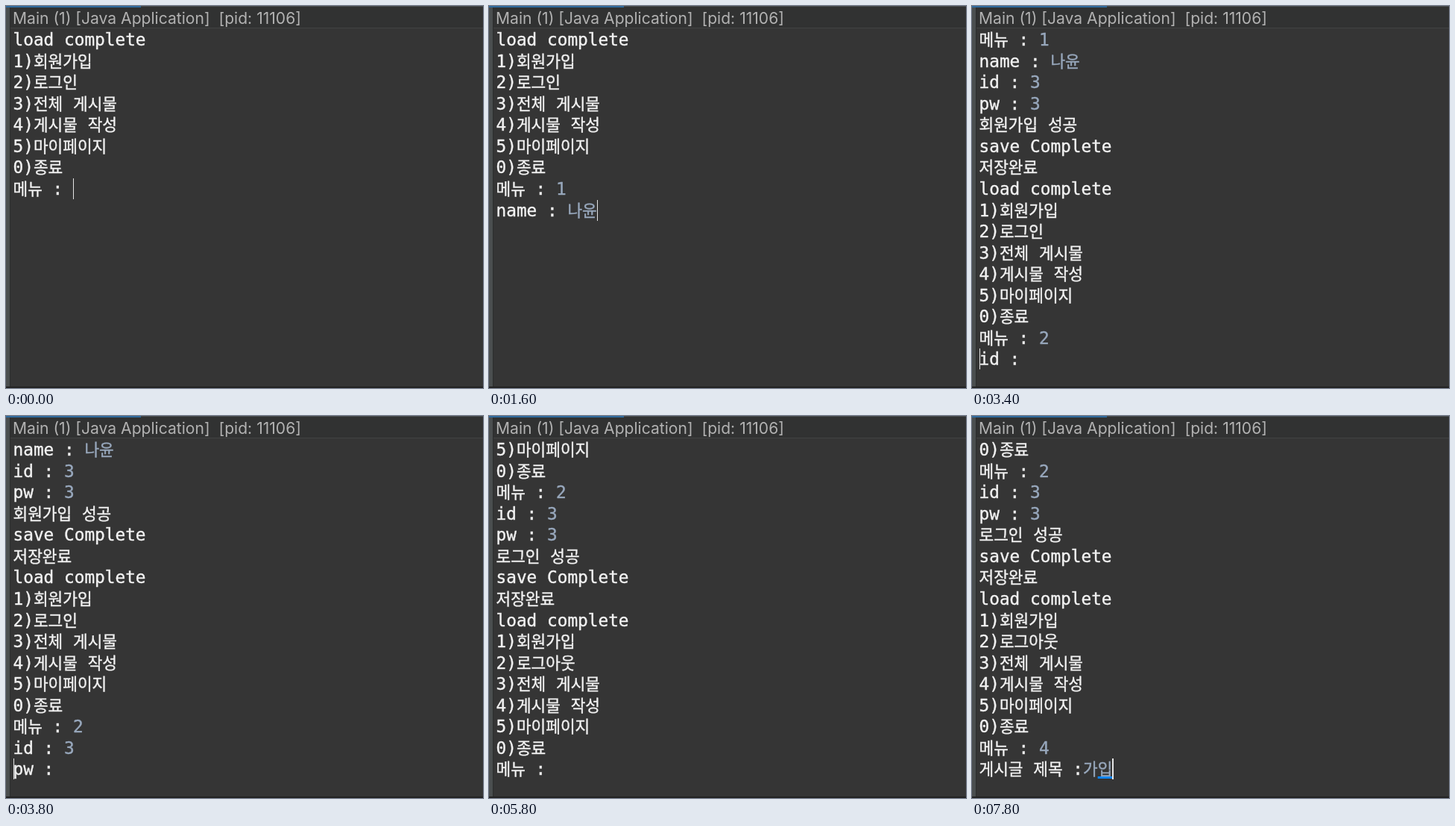
An HTML page that plays this animation: 640x512 px, repeating every 8000 ms.

```html
<!DOCTYPE html>
<html lang="ko">
<head>
<meta charset="utf-8">
<title>Console</title>
<style>
  html, body { margin: 0; width: 100%; height: 100%; overflow: hidden; background: #353535; }
  #stage { position: absolute; left: 0; top: 0; width: 640px; height: 512px; overflow: hidden; background: #353535; }
  #stage > div { position: absolute; }
  #header { left: 6px; top: 0; width: 634px; height: 29px; background: #313232; border-bottom: 1px solid #424343; }
  #gutter { left: 0; top: 0; width: 5px; height: 512px; background: #4a4e4f; border-right: 1px solid #2c2d2d; }
  #top { left: 0; top: 0; width: 640px; height: 1px; background: #4b4f51; }
  #tab { left: 0; top: 0; width: 181px; height: 2px; background: #2f6a9d; }
  #bottom { left: 0; top: 510px; width: 640px; height: 2px; background: #222; }
  #title { left: 9px; top: 2.5px; font: 21.1px/27px Inter, sans-serif; color: #b2b2b2; white-space: pre; }
  #rows { left: 9.5px; top: 31px; font: 22.75px/28.57px "DejaVu Sans Mono", monospace; color: #f2f2f2; -webkit-text-stroke: .4px; }
  #rows p { margin: 0; height: 28.57px; white-space: pre; position: relative; }
  .ko { font: 500 21.4px/0 "Noto Sans CJK KR", "Noto Sans CJK", sans-serif; }
  .input { color: #98a8bd; }
  .ime { text-decoration: underline 3px #0a84ff; text-underline-offset: 2px; text-decoration-skip-ink: none; }
  .caret { position: absolute; top: 0; width: 1.5px; height: 28px; background: #e4e4e4; }
  .caret.home { left: 0; }
</style>
</head>
<body>
<div id="stage">
  <div id="header"></div>
  <div id="gutter"></div>
  <div id="top"></div>
  <div id="tab"></div>
  <div id="title">Main (1) [Java Application]  [pid: 11106]</div>
  <div id="rows"></div>
  <div id="bottom"></div>
</div>
<script>
const LOOP = 8000, BLINK = 400, VISIBLE_ROWS = 16;
const rowsBox = document.getElementById('rows');

const menu = second => ['load complete', '1)회원가입', '2)' + second, '3)전체 게시물',
  '4)게시물 작성', '5)마이페이지', '0)종료', '메뉴 : '];
const saved = (result, second) => [result, 'save Complete', '저장완료', ...menu(second)];

const print = (at, ...lines) => ({ at, lines });
const type = (at, text, composing = false) => ({ at, text, composing });

const timeline = [
  type(0, ''),
  type(200, '1'),
  print(600, 'name : '),
  type(800, 'ㄴ', true),
  type(1000, '나', true),
  type(1200, '나유', true),
  type(1400, '나윤', true),
  type(1600, '나윤'),
  print(1800, 'id : '),
  type(2000, '3'),
  print(2200, 'pw : '),
  type(2400, '3'),
  print(2600, ...saved('회원가입 성공', '로그인')),
  type(3200, '2'),
  print(3400, 'id : '),
  type(3600, '3'),
  print(3800, 'pw : '),
  type(4000, '3'),
  print(4400, ...saved('로그인 성공', '로그아웃')),
  type(6200, '4'),
  print(6400, '게시글 제목 :'),
  type(7200, 'ㄱ', true),
  type(7400, '가', true),
  type(7600, '가이', true),
  type(7800, '가입', true),
];

const styled = text => text.replace(/[ㄱ-힣]+/g, '<span class="ko">$&</span>');
const span = (name, text) => text ? `<span class="${name}">${styled(text)}</span>` : '';

function consoleAt(time) {
  const lines = menu('로그인').map(prompt => ({ prompt, input: '', pending: '' }));
  let caret, last;
  for (const event of timeline) {
    if (event.at > time) break;
    last = event.at;
    if (event.lines) {
      caret = { row: lines.length, home: true };
      lines.push(...event.lines.map(prompt => ({ prompt, input: '', pending: '' })));
    } else {
      const split = event.text.length - (event.composing ? 1 : 0);
      const line = lines[lines.length - 1];
      line.input = event.text.slice(0, split);
      line.pending = event.text.slice(split);
      caret = { row: lines.length - 1, home: false };
    }
  }
  caret.on = (time - last) % (2 * BLINK) < BLINK;
  return { lines, caret };
}

function render(time) {
  const { lines, caret } = consoleAt(time);
  const first = Math.max(0, lines.length - VISIBLE_ROWS);
  return lines.slice(first).map((line, i) => {
    const mark = caret.on && caret.row === first + i
      ? `<i class="caret${caret.home ? ' home' : ''}"></i>` : '';
    return `<p>${styled(line.prompt)}${span('input', line.input)}${span('input ime', line.pending)}${mark}</p>`;
  }).join('');
}

const start = performance.now();
let shown = '';
function tick() {
  const html = render((performance.now() - start) % LOOP);
  if (html !== shown) rowsBox.innerHTML = shown = html;
  requestAnimationFrame(tick);
}
tick();
</script>
</body>
</html>
```
